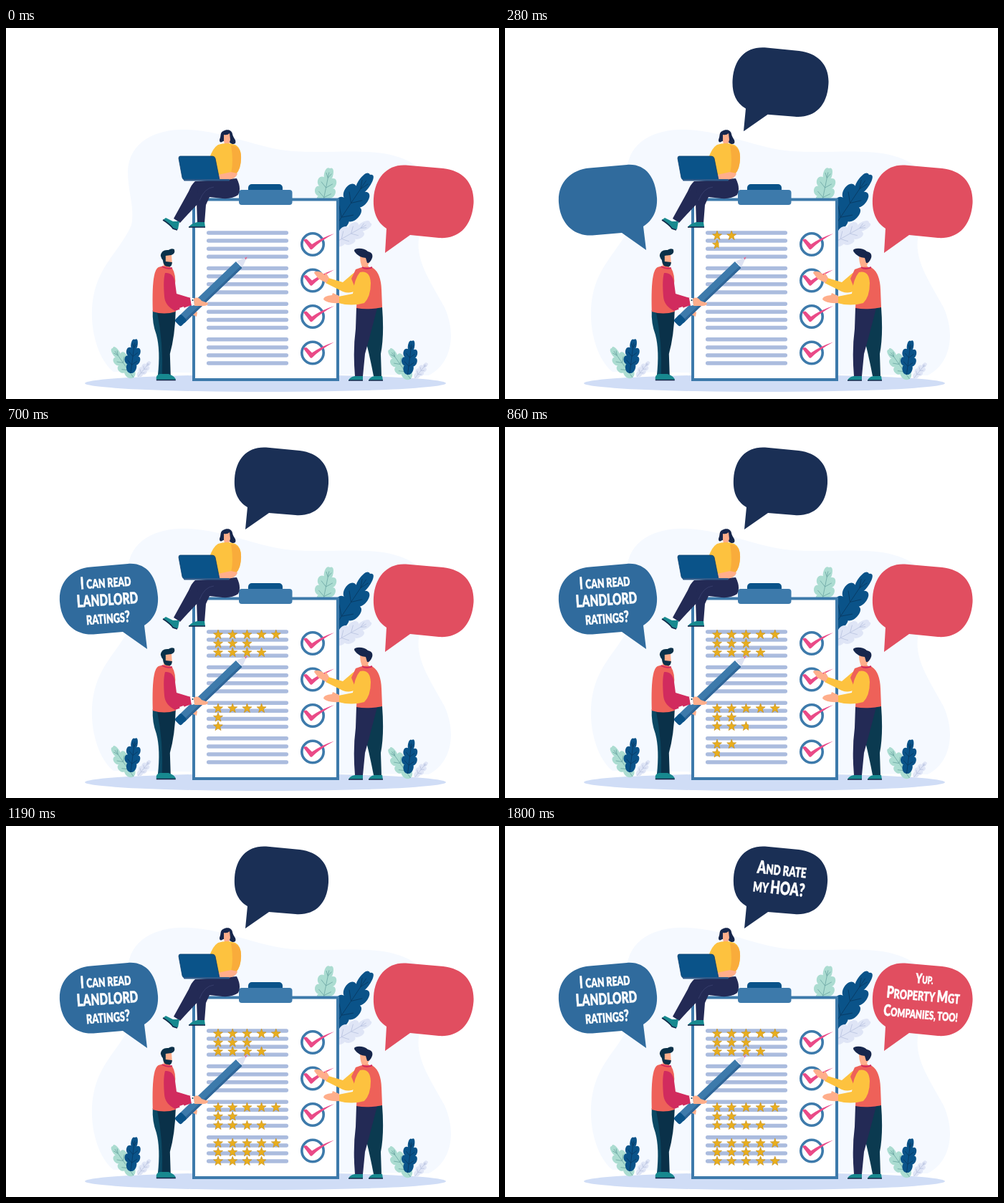
Animation of 688x518 px, one loop 6460 ms. Source, as an HTML page:

```html
<!DOCTYPE html>
<html lang="en">
<head>
<meta charset="utf-8">
<title>Ratings</title>
<style>
html, body { margin: 0; width: 100%; height: 100%; overflow: hidden; background: #fff; }
svg { display: block; width: 100vw; height: 100vh; }
.say { font: 900 18px Lato, "Open Sans", sans-serif; fill: #fff; stroke: #fff; stroke-width: .5; text-anchor: middle; text-transform: uppercase; }
.skin { fill: #ffae8b; }
.ink { fill: #232a55; }
.deep { fill: #0a3149; }
.steel { fill: #3d7aab; }
.navy { fill: #0a5389; }
.vest { fill: #ee6159; }
.rose { fill: #d12b5e; }
.sun { fill: #fdc23f; }
.shoe { fill: #17898f; }
.sole { fill: none; stroke: #16284a; stroke-width: 1.6; }
</style>
</head>
<body>
<svg viewBox="0 0 688 518" xmlns="http://www.w3.org/2000/svg">
  <defs id="defs"></defs>
  <path fill="#f5f9ff" d="M170 200C172 155 215 140 255 142C310 145 350 168 400 172C460 176 520 165 560 185C600 205 590 250 578 285C568 320 590 350 612 390C630 430 620 470 590 485L150 480C125 460 115 410 122 375C130 330 160 310 175 275C180 250 170 230 170 200Z"/>
  <ellipse cx="362" cy="496" rx="252" ry="12" fill="#d0ddf6"/>
  <g id="leaves"></g>

  <rect x="262" y="239.500" width="201" height="251.500" fill="#fff" stroke="#3d7aab" stroke-width="4"/>
  <rect class="navy" x="338" y="218" width="48" height="14" rx="5"/>
  <rect class="steel" x="325" y="226" width="74.500" height="21" rx="4"/>
  <g id="lines" stroke="#abbcde" stroke-width="5.500" stroke-linecap="round"></g>
  <g id="checks"></g>

  <!-- seated woman -->
  <path class="ink" d="M264 214L300 212L296 232L279 234Q262 251 243 272L234 266L255 228Q259 218 264 214Z"/>
  <path class="ink" d="M272 214L322 210Q329 224 324 233Q316 239 302 238L284 236L279 247L277 273L267 273L266 243Q267 222 272 214Z"/>
  <path d="M290 222Q277 223 270 241" fill="none" stroke="#3a4270" stroke-width=".8"/>
  <path class="shoe" d="M219 268L223 265L233 270L242 270L240 281Q236 283 232 279Z"/>
  <path class="sole" d="M219 268Q229 274 233 280L239 282"/>
  <path class="shoe" d="M255 278Q258 273 267 271L277 271L278 278Z"/>
  <path class="sole" d="M255 278H278"/>
  <path fill="#16264c" d="M303 144C308 141 315 142 316 148C317 154 322 156 320 161C316 164 312 160 311 158L303 158C298 162 297 157 299 153C300 149 299 146 303 144Z"/>
  <path class="skin" d="M304 149Q309 150 312 147L313 156L311 163Q308 165 305 162L304 158Z"/>
  <path class="sun" d="M296 163Q308 159 320 163Q329 168 328 184Q327 198 320 204L294 212L284 182Q288 168 296 163Z"/>
  <path fill="#f9ac3b" d="M314 164Q328 164 328 181Q328 197 321 204L314 203Q318 186 314 164Z"/>
  <path class="skin" d="M296 205L314 201L323 203Q322 210 310 212H296Z"/>
  <path class="navy" d="M243 179H288Q291 179 292 182L298 212H249Q247 212 246 209L241 182Q241 179 243 179Z" stroke="#0b3d6c" stroke-width=".8"/>
  <rect x="248" y="211" width="64" height="2.500" rx="1" fill="#2f5b8a"/>

  <!-- left man -->
  <g transform="translate(.8 0)">
    <path fill="#0b4863" d="M204 394L222 397V486H211Q215 450 209 428Q203 412 204 394Z"/>
    <path class="deep" d="M210 396L236 395Q235 430 228 455L229 486H217Q219 440 210 396Z"/>
    <path class="shoe" d="M209 491Q208 484 214 483H226Q235 486 236 491Z"/>
    <path class="sole" d="M209 491.500H236"/>
    <path class="skin" d="M219 316L230 314L231 328L227 336L219 336Z"/>
    <path class="deep" d="M215 318Q216 309 226 310Q230 307 234 309Q236 315 230 317L222 318L222 326L231 327Q231 334 225 334Q219 333 218 324Q216 322 215 318Z"/>
    <path class="vest" d="M212 334Q222 330 231 335Q237 345 235 360L236 396Q220 401 204 396Q203 360 206 346Q208 336 212 334Z"/>
    <path d="M217 333Q224 337 231 335" fill="none" stroke="#d12b5e" stroke-width="2"/>
  </g>
  <path class="skin" d="M258 391L267 397L266 403L258 399Z"/>
  <g transform="translate(242 410) rotate(-43.700)">
    <path class="steel" d="M4-6.200H115V6.200H4Z"/>
    <path fill="#2f6698" d="M4 3H115V6.200H4Z"/>
    <rect class="navy" x="-4" y="-6.200" width="13" height="12.400" rx="3"/>
    <path fill="#dde2f2" d="M115-6.200L131 0L115 6.200Q118 4 115 2.500Q118 0 115-2.500Q118-4 115-6.200Z"/>
    <path fill="#d56a94" d="M127-1.600L131 0L127 1.600Z"/>
  </g>
  <path class="rose" d="M222 342Q234 341 236 356L238 371L258 377L259 387L236 395Q222 388 221 375Q219 352 222 342Z"/>
  <path d="M257 377L262 377L263 387L259 388ZM242 391L248 389L249 393L244 396Z" fill="#fff"/>
  <circle cx="260.500" cy="380" r="1" class="deep"/>
  <path class="skin" d="M262 378Q268 374 273 381L282 384Q282 388 275 388L263 388Z"/>

  <!-- right man -->
  <path fill="#0b3a50" d="M505 391L525 390Q528 430 523 455L524 486H513Q508 460 503 440Z"/>
  <path class="ink" d="M489 390L518 391Q508 430 501 455L498 486H487Q484 450 488 420Z"/>
  <path class="shoe" d="M478 492Q480 487 487 486H498V492ZM506 492Q508 487 514 486H525L526 492Z"/>
  <path class="sole" d="M478 492H498M506 492H526"/>
  <path class="skin" d="M494 317L503 318L508 326L505 331L508 337L498 337L496 331Q494 326 494 317Z"/>
  <path fill="#16264c" d="M487 313Q484 309 490 308Q499 307 505 312Q513 314 511 321Q508 329 504 328L502 321Q492 320 487 313Z"/>
  <path class="sun" d="M484 343Q492 337 494 350L488 366Q480 372 470 368L446 356L450 349L470 355Z"/>
  <path class="vest" d="M488 337Q500 331 512 335Q523 342 524 365L525 390Q505 394 489 391L490 370L482 350Z"/>
  <path d="M497 334Q503 338 511 334" fill="none" stroke="#d12b5e" stroke-width="2"/>
  <path class="sun" d="M494 341Q508 338 509 356Q509 375 500 384Q482 389 464 384L464 375L484 371Q486 350 494 341Z"/>
  <path class="skin" d="M451 349L446 341L445 345L440 341Q431 338 430 342L436 350L447 356ZM465 374L456 370L455 373Q443 374 443 379Q448 385 465 384Z"/>

  <g id="stars" fill="#e9ae1c" stroke="#c48f1a" stroke-width=".7"></g>
  <g id="blue"><path fill="#306b9d" d="M170 191L118 195.500C91 198 73 217 75 244C77 273 96 291 122 289.500L163 286L197 310L193 277C207 268 213 254 212 237C210 208 196 189 170 191Z"/></g>
  <g id="dark"><path fill="#1a2f55" d="M363 28.500L410 33C436 36 452 53 450 79C448 110 430 125 404 123L367 120L334 143L337 112C322 103 318 89 319 72C321 44 337 27 363 28.500Z"/></g>
  <g id="red"><path fill="#e14e60" d="M558 191.500L610 196C638 199 654 217 652.500 245C650 277 632 295 604 293L564 289L529 314L531 280C517 271 512 256 513 238C515 209 532 190 558 191.500Z"/></g>
</svg>
<script>
const LOOP = 6460;
const NS = "http://www.w3.org/2000/svg";
const $ = id => document.getElementById(id);
const clamp = v => Math.max(0, Math.min(1, v));

function add(parent, tag, attrs, text) {
  const el = document.createElementNS(NS, tag);
  for (const k in attrs) el.setAttribute(k, attrs[k]);
  if (text) el.textContent = text;
  parent.appendChild(el);
  return el;
}

// Lobed leaf from base (x1, y1) to tip (x2, y2)
function leaf(x1, y1, x2, y2, half, fill, vein) {
  const len = Math.hypot(x2 - x1, y2 - y1), lobes = 4;
  const turn = Math.atan2(y2 - y1, x2 - x1) * 180 / Math.PI;
  const wide = u => half * Math.sin(Math.PI * Math.min(1, .12 + .85 * u));
  let d = "M0 0", veins = `M0 0H${len * .9}`;
  const lobe = (i, side, back) => {
    const a = i / lobes, b = (i + 1) / lobes, m = (a + b) / 2;
    const from = back ? b : a, to = back ? a : b;
    const y = side * wide(m) * 1.25, end = to === 0 || to === 1 ? 0 : side * wide(to) * .5;
    const lean = .1 * len;
    d += `C${from * len + (back ? lean : 0)} ${y} ${to * len + (back ? 0 : lean * .6)} ${y} ${to * len} ${end}`;
    if (i) veins += `M${a * len} 0L${m * len} ${side * wide(m) * .65}`;
  };
  for (let i = 0; i < lobes; i++) lobe(i, -1, false);
  for (let i = lobes - 1; i >= 0; i--) lobe(i, 1, true);
  const g = add($("leaves"), "g", { transform: `translate(${x1} ${y1}) rotate(${turn})` });
  add(g, "path", { d: d + "Z", fill });
  add(g, "path", { d: veins, fill: "none", stroke: vein, "stroke-width": .8 });
}

const MINT = ["#abdcd1", "#6fa9a6"], TEAL = ["#0a5389", "#083a63"], PALE = ["#dfe5f6", "#bcc6e2"];
leaf(441, 250, 452, 196, 14, ...MINT);
leaf(455, 284, 508, 205, 19, ...TEAL);
leaf(455, 302, 508, 272, 13, ...PALE);
for (const [x, y] of [[0, 0], [386.5, 2]]) {
  leaf(178 + x, 488 + y, 149 + x, 447 + y, 11, ...MINT);
  leaf(174 + x, 482 + y, 180 + x, 435 + y, 10.5, ...TEAL);
  leaf(184 + x, 487 + y, 201 + x, 466 + y, 6, ...PALE);
}

for (let i = 0; i < 16; i++) {
  const y = 286 + 49.6 * Math.floor(i / 4) + 11.1 * (i % 4);
  add($("lines"), "path", { d: `M282.700 ${y}H391.300` });
}
for (let i = 0; i < 4; i++) {
  const g = add($("checks"), "g", { transform: `translate(428 ${302 + 50.5 * i})` });
  add(g, "circle", { r: 15.2, fill: "#fff", stroke: "#3d7aab", "stroke-width": 3.6 });
  add(g, "path", { d: "M-13-6Q-9-9-7-6L-1 0Q12-9 30-15Q11-5-1 7Q-3 8-4 6Z", fill: "#ea4a87" });
}

// Star rows: each row is wiped in from the left
const GAP = 20.2, WIPE = 320, LAG = [0, .22, .62];
const groups = [
  { y: 290, at: 155, counts: [5, 3, 4] },
  { y: 393, at: 444, counts: [5, 2, 4] },
  { y: 443, at: 744, counts: [5, 4, 5] }
];
function star(cx, cy) {
  let d = "";
  for (let k = 0; k < 10; k++) {
    const r = k % 2 ? 2.8 : 6.8, a = Math.PI * (k / 5 - .5);
    d += (k ? "L" : "M") + (cx + r * Math.cos(a)).toFixed(2) + " " + (cy + r * Math.sin(a)).toFixed(2);
  }
  return d + "Z";
}
const rows = [];
groups.forEach((group, gi) => group.counts.forEach((n, ri) => {
  const id = `wipe${gi}${ri}`, y = group.y + 12.5 * ri;
  const clip = add($("defs"), "clipPath", { id });
  const rect = add(clip, "rect", { x: 289, y: y - 9, width: 0, height: 18 });
  let d = "";
  for (let i = 0; i < n; i++) d += star(296 + GAP * i, y);
  add($("stars"), "path", { d, "clip-path": `url(#${id})` });
  rows.push({ rect, span: (n - 1) * GAP + 14, start: group.at + LAG[ri] * WIPE });
}));

// Bubble lettering: each line is [x, baseline, [text, size]...]
function say(id, turn, lines) {
  const box = add($(id), "g", { class: "say" });
  for (const [x, y, ...parts] of lines) {
    const el = add(box, "text", { transform: `translate(${x} ${y}) rotate(${turn}) scale(.7 1)` });
    for (const [text, size] of parts) add(el, "tspan", { "font-size": size }, text);
  }
  return box;
}
const speech = [
  [700, say("blue", -4, [
    [139.5, 224, ["I ", 23], ["can read", 17.5]],
    [142, 249, ["L", 24], ["andlord", 22]],
    [143, 274, ["ratings", 18], ["?", 22]]
  ])],
  [1470, say("dark", 6, [
    [385.5, 69, ["A", 25], ["nd rate", 19]],
    [381.5, 95, ["my ", 19], ["HOA?", 25]]
  ])],
  [1800, say("red", 5, [
    [585, 220, ["Y", 19], ["up.", 14.5]],
    [583, 244, ["P", 23], ["roperty ", 18], ["M", 23], ["gt", 18]],
    [579.5, 269, ["C", 22], ["ompanies, too!", 16.3]]
  ])]
];

// Grow past full size, then settle
function pop(t, start) {
  const u = t - start;
  return u < 90 ? 1.25 * clamp(u / 90) : 1.25 - .25 * clamp((u - 90) / 120);
}
function scaleAt(id, cx, cy, s) {
  $(id).setAttribute("transform", `translate(${cx} ${cy}) scale(${s}) translate(${-cx} ${-cy})`);
  $(id).style.display = s > 0 ? "" : "none";
}

function draw(t) {
  scaleAt("blue", 143.5, 250, pop(t, 30));
  scaleAt("dark", 384.5, 85.5, pop(t, 81));
  for (const r of rows) r.rect.setAttribute("width", r.span * clamp((t - r.start) / WIPE));
  for (const [at, el] of speech) el.style.display = t >= at ? "" : "none";
}

const begin = performance.now();
function tick() {
  draw((performance.now() - begin) % LOOP);
  requestAnimationFrame(tick);
}
draw(0);
requestAnimationFrame(tick);
</script>
</body>
</html>
```
